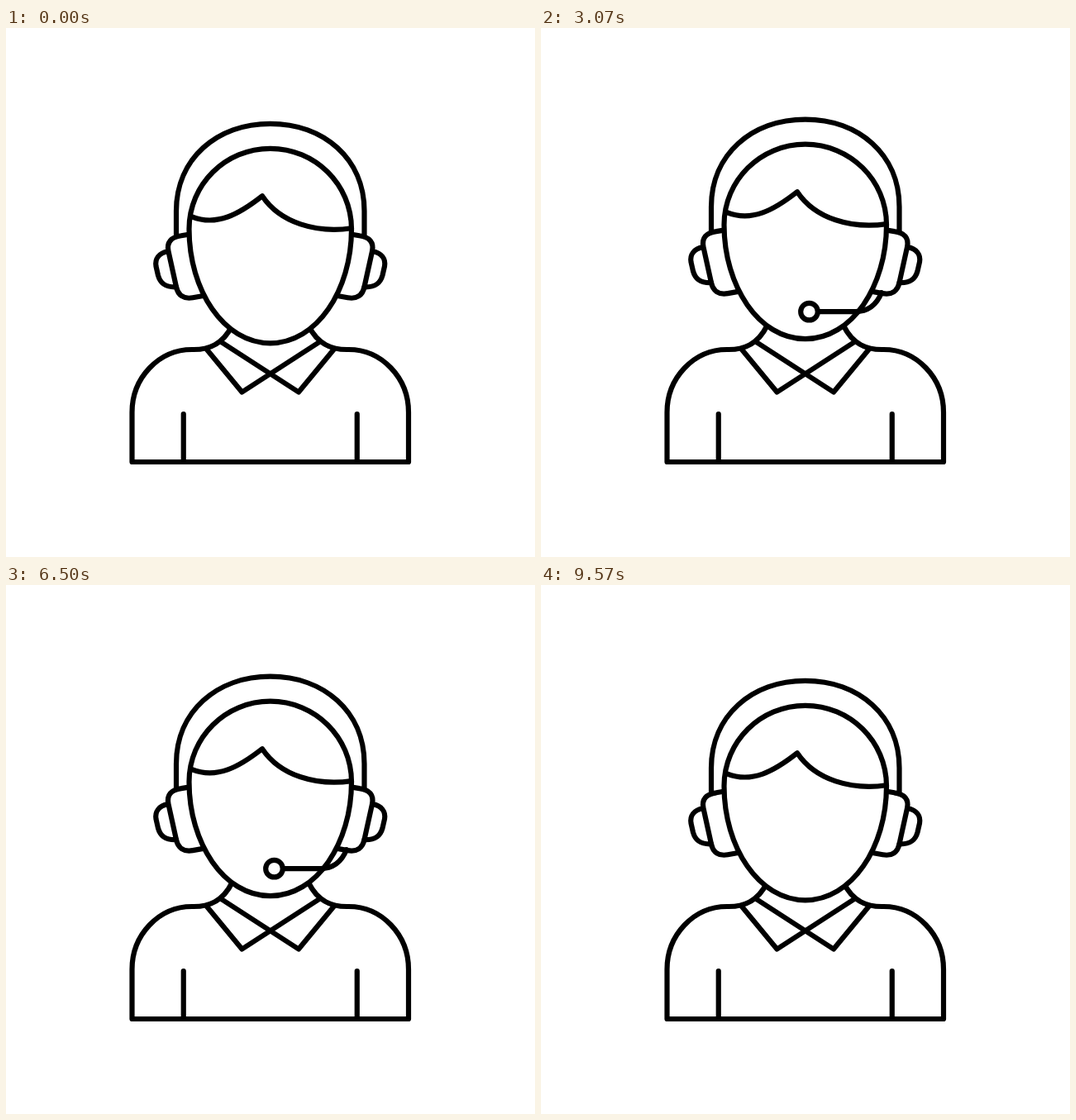
Recreate the animation shown at these times as an HTML page with a canvas. Size 640 px wide and 640 px high, loop 9640 ms.

```html
<!DOCTYPE html>
<html lang="en">
<head>
<meta charset="utf-8">
<title>Support agent</title>
<style>
  html, body { margin: 0; width: 100%; height: 100%; overflow: hidden; background: #fff; }
  canvas { display: block; width: 640px; height: 640px; }
</style>
</head>
<body>
<canvas id="stage" width="640" height="640"></canvas>
<script>
const ctx = document.getElementById('stage').getContext('2d');
const LOOP = 9640;
const BOB = LOOP / 4;
const REST = 0.6;
const LIFT = 6.9;
const STEP = 1000 / 14;
const AXIS = 639.5;

const shoulder = new Path2D('M319.75 525 H152.5 V465 C152.5 423 185 389 225 389 C245 389.5 262 383 273 361 L274 358');
const sleeve = new Path2D('M214.75 467 V525');
const collar = new Path2D('M243 389 L285.5 440.5 L379 380');
const band = new Path2D('M206 250 V221 C206 158 255 115.5 319.75 115.5 S433.5 158 433.5 221 V250');
const cushion = new Path2D('M221 249.5 L212 251 C200 252.5 194 259 196.5 270 L206 313 C208 323 215 328 226 326 L240 323.5');
const cup = new Path2D('M196 270 C185 272 180 279 181.5 288 L184 299 C187 310 194 313.5 206 313');
const face = new Path2D('M221.5 243 C221.5 189 265.5 145.5 319.75 145.5 S418 189 418 243 C418 317 376 381 319.75 381 S221.5 317 221.5 243 Z');
const hair = new Path2D('M225 228 C255 240 282 225 310 203 C332 236 376 248 418 242');
const boom = new Path2D('M412 325 C406 340 396 348 380 348 H335');
const BOOM_LENGTH = 86;

const clamp = v => Math.max(0, Math.min(1, v));
const ease = v => v * v * (3 - 2 * v);

function mirrored(path) {
  ctx.stroke(path);
  ctx.save();
  ctx.translate(AXIS, 0);
  ctx.scale(-1, 1);
  ctx.stroke(path);
  ctx.restore();
}

// The boom grows out of the ear cup, then the mic ring closes.
function drawMic(amount) {
  if (amount <= 0) return;
  const tube = clamp(amount / 0.6);
  const ring = clamp((amount - 0.6) / 0.4);
  ctx.save();
  if (tube < 1) ctx.setLineDash([BOOM_LENGTH * tube, 2 * BOOM_LENGTH]);
  ctx.stroke(boom);
  ctx.restore();
  if (ring > 0) {
    ctx.beginPath();
    ctx.arc(324.5, 348, 10.3, 0, 2 * Math.PI * ring);
    ctx.stroke();
  }
}

function draw(time) {
  const lift = REST - LIFT * Math.abs(Math.sin(Math.PI * (time + STEP / 2) / BOB));
  const mic = ease(clamp((time - 300) / 900)) * ease(clamp((9300 - time) / 900));

  ctx.fillStyle = '#fff';
  ctx.fillRect(0, 0, 640, 640);
  ctx.strokeStyle = '#000';
  ctx.lineWidth = 6.2;
  ctx.lineCap = ctx.lineJoin = 'round';

  mirrored(shoulder);
  mirrored(sleeve);
  mirrored(collar);

  ctx.save();
  ctx.translate(0, lift);
  ctx.stroke(band);
  mirrored(cushion);
  mirrored(cup);
  ctx.fill(face);
  ctx.stroke(face);
  ctx.stroke(hair);
  drawMic(mic);
  ctx.restore();
}

function tick() {
  const time = performance.now() % LOOP;
  draw(Math.floor((time + 8) / STEP) * STEP % LOOP);
  requestAnimationFrame(tick);
}
tick();
</script>
</body>
</html>
```
